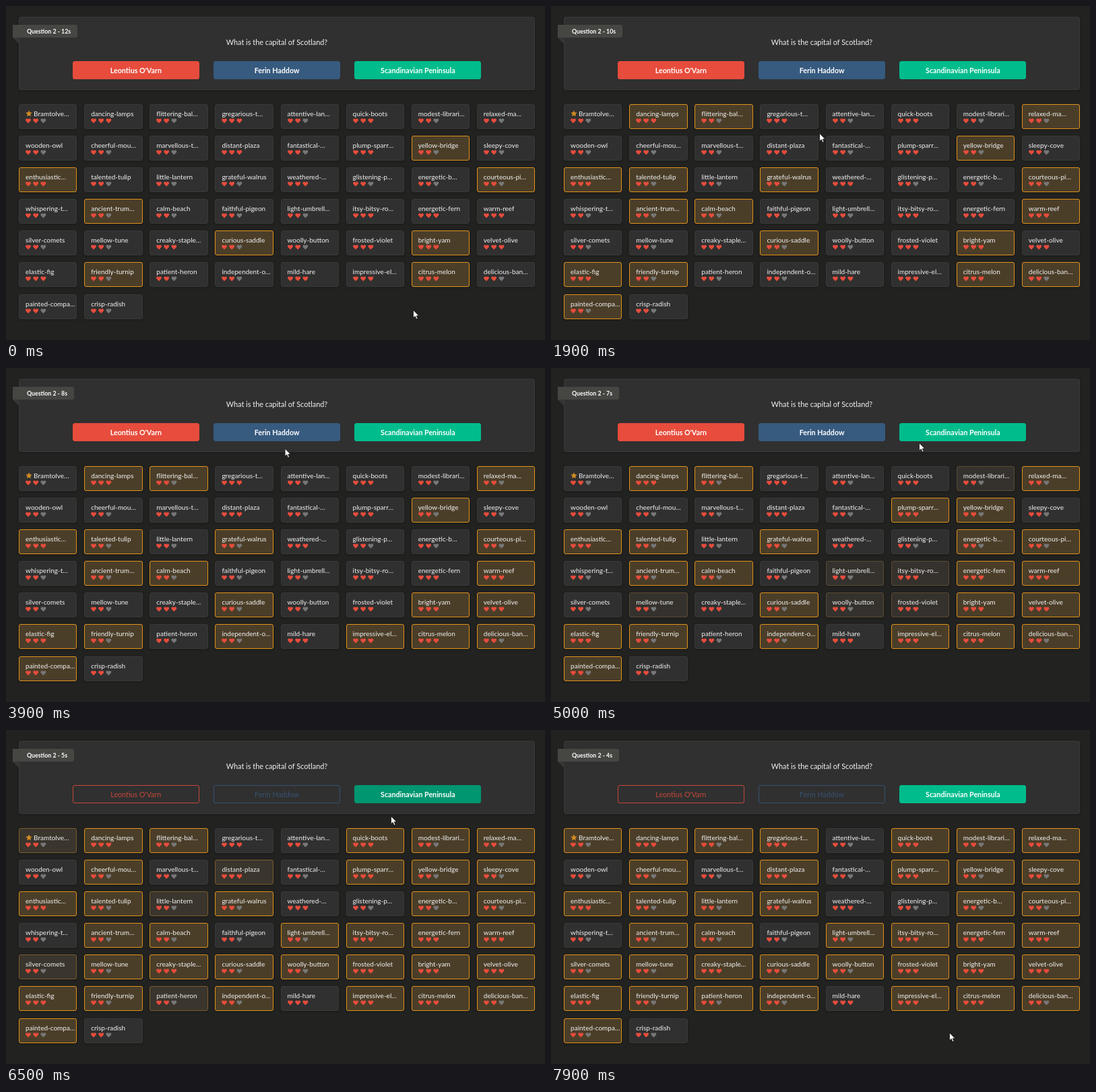
Animation of 800x497 px, one loop 8 s. Source, as an HTML page:

```html
<!DOCTYPE html>
<html lang="en">
<head>
<meta charset="utf-8">
<title>Quiz</title>
<style>
  html, body { margin: 0; width: 100%; height: 100%; overflow: hidden; background: #222221; }
  body { position: relative; font: 10px/14px Lato, sans-serif; color: #f2f2f2; }
  div, i, svg, button { position: absolute; box-sizing: border-box; white-space: nowrap; }
  .panel, .card { background: #303030; border: 1px solid #393939; border-radius: 3px; box-shadow: 0 1px 3px #1a1a19; }
  .panel { left: 19px; top: 16px; width: 766px; height: 109px; }
  .ribbon { left: 10px; top: 28px; height: 19px; padding: 0 9.5px 0 21px; background: #464643;
    border-radius: 0 3px 3px 0; font: bold 8.8px/19px Lato, sans-serif; color: #fff; }
  .fold { left: 10px; top: 47px; border: solid transparent; border-width: 0 9px 9px 0; border-right-color: #363634; }
  .question { left: 19px; width: 766px; top: 46px; text-align: center; font-size: 10.9px; line-height: 15px; }
  button { top: 82px; width: 188px; height: 27px; padding: 0; border: 1px solid; border-radius: 3px;
    font: bold 10.7px/25px Lato, sans-serif; }
  .card { width: 86.4px; height: 37px; }
  .card i { inset: -1px; border: 1px solid #e09219; border-radius: 3px; background: #4b3e29; }
  .card div { left: 9px; top: 6px; }
  .card svg { left: 9px; top: 20px; }
  .card .star { left: 8.5px; top: 8px; }
  .star + div { left: 21px; }
  #arrow, #hand { left: 0; top: 0; }
</style>
</head>
<body>
<div class="panel"></div>
<div class="fold"></div>
<div class="ribbon"></div>
<div class="question">What is the capital of Scotland?</div>
<svg id="arrow" width="12" height="17"><path d="M.5 .5V12L3.2 9.6 5 14l2-.9L5.2 9H8.8Z" fill="#fff" stroke="#111" stroke-width=".8"/></svg>
<svg id="hand" width="14" height="15"><path d="M3 1.2Q4.2 0 5 1.4V5L10 6Q11 6.3 10.8 7.5L10 12.5H4.6L1 8.3Q1 7 3 8Z" fill="#fff" stroke="#111" stroke-width=".8"/></svg>
<script>
const LOOP = 8000, FADE = 250, HOVER = 5300, CLICK = 6300, RELEASE = 7650;

// Each player: name, * for three lives, then the wave in which the answer arrives, if any.
const players = `Bramtolve…7 dancing-lamps*2 flittering-bal…2 gregarious-t…*8 attentive-lan… quick-boots*6 modest-librari…5 relaxed-ma…1
wooden-owl cheerful-mou…6 marvellous-t… distant-plaza*7 fantastical-… plump-sparr…*4 yellow-bridge0 sleepy-cove6
enthusiastic…*0 talented-tulip1 little-lantern7 grateful-walrus2 weathered-…* glistening-p… energetic-b…4 courteous-pi…0
whispering-t… ancient-trum…0 calm-beach2 faithful-pigeon light-umbrell…5 itsy-bitsy-ro…*5 energetic-fern*4 warm-reef*2
silver-comets7 mellow-tune5 creaky-staple…*6 curious-saddle0 woolly-button5 frosted-violet*5 bright-yam*0 velvet-olive*3
elastic-fig*2 friendly-turnip0 patient-heron7 independent-o…3 mild-hare* impressive-el…*3 citrus-melon*0 delicious-ban…1
painted-compa…2 crisp-radish`.split(/\s+/);
const waves = [-FADE, 300, 1450, 2850, 3950, 4950, 5650, 6400, RELEASE];

// Pointer stops: arrival, departure, x, y
const stops = [
  [0, 50, 604, 452], [900, 1150, 530, 267], [2500, 2900, 293, 127], [5000, 5000, 546, 111],
  [5500, CLICK, 568, 101], [6900, 6900, 577, 181], [7100, 7100, 585, 421], [7500, LOOP, 591, 450]
];

const clamp = v => Math.max(0, Math.min(1, v));
const find = selector => document.querySelector(selector);
const arrow = find("#arrow"), hand = find("#hand"), ribbon = find(".ribbon");

function add(tag, x, html, className = "") {
  const el = document.createElement(tag);
  el.className = className;
  el.style.left = x + "px";
  el.innerHTML = html;
  document.body.insertBefore(el, arrow);
  return el;
}

const heart = (i, lives) =>
  `<path transform="translate(${i * 11.2})" fill="${i < lives ? "#e74c3c" : "#777"}"
    d="M4 7.5L.6 4C-.3 2.9 0 .4 2 .4Q3.2.4 4 1.5 4.8.4 6 .4C8 .4 8.3 2.9 7.4 4Z"/>`;
const star = `<svg class="star" width="10" height="10"><path fill="#cf8a22"
  d="M5 .3L6.4 3.3 9.7 3.7 7.3 6 7.9 9.3 5 7.7 2.1 9.3 2.7 6 .3 3.7 3.6 3.3Z"/></svg>`;

const cards = players.map((player, i) => {
  const [, name, full, wave] = player.match(/^([^*\d]+)(\*?)(\d?)$/);
  const hearts = [0, 1, 2].map(n => heart(n, full ? 3 : 2)).join("");
  const card = add("div", 19.1 + 97.1 * (i % 8),
    `<i></i>${i ? "" : star}<div>${name}</div><svg width="32" height="9">${hearts}</svg>`, "card");
  card.style.top = 145.7 + 47.15 * Math.floor(i / 8) + "px";
  return { glow: card.firstChild, start: wave ? waves[wave] : Infinity };
});

const choices = [["Leontius O'Varn", "#e74c3c"], ["Ferin Haddow", "#375a7f"], ["Scandinavian Peninsula", "#00bc8c"]]
  .map(([label, color], i) => ({ color, el: add("button", 98.8 + 209.3 * i, label) }));

function paintChoice(el, color, outlined) {
  Object.assign(el.style, {
    borderColor: color, background: outlined ? "transparent" : color, color: outlined ? color : "#fff",
    fontWeight: outlined ? 400 : 700, opacity: outlined ? 0.82 : 1
  });
}

function pointerAt(t) {
  const n = stops.findIndex(stop => stop[0] > t);
  const [, leave, x, y] = stops.at(n < 0 ? -1 : n - 1);
  if (n < 0 || t <= leave) return [x, y];
  const [arrive, , x1, y1] = stops[n];
  const k = (t - leave) / (arrive - leave);
  return [x + (x1 - x) * k, y + (y1 - y) * k];
}

function draw(t) {
  ribbon.textContent = `Question 2 - ${12 - Math.floor((t + 600) / 1000)}s`;

  for (const { glow, start } of cards) glow.style.opacity = clamp((t - start) / FADE);

  const [red, blue, green] = choices;
  for (const { el, color } of [red, blue]) paintChoice(el, color, t >= CLICK);
  const idle = t < HOVER || t >= RELEASE;
  paintChoice(green.el, idle ? green.color : t < CLICK ? "#00a47a" : "#009670", false);

  const [x, y] = pointerAt(t);
  const pointing = t >= HOVER && t < CLICK + 100;
  arrow.style.display = pointing ? "none" : "block";
  hand.style.display = pointing ? "block" : "none";
  arrow.style.transform = `translate(${x}px, ${y}px)`;
  hand.style.transform = `translate(${x - 4}px, ${y}px)`;
}

function tick() {
  draw(performance.now() % LOOP);
  requestAnimationFrame(tick);
}
tick();
</script>
</body>
</html>
```
